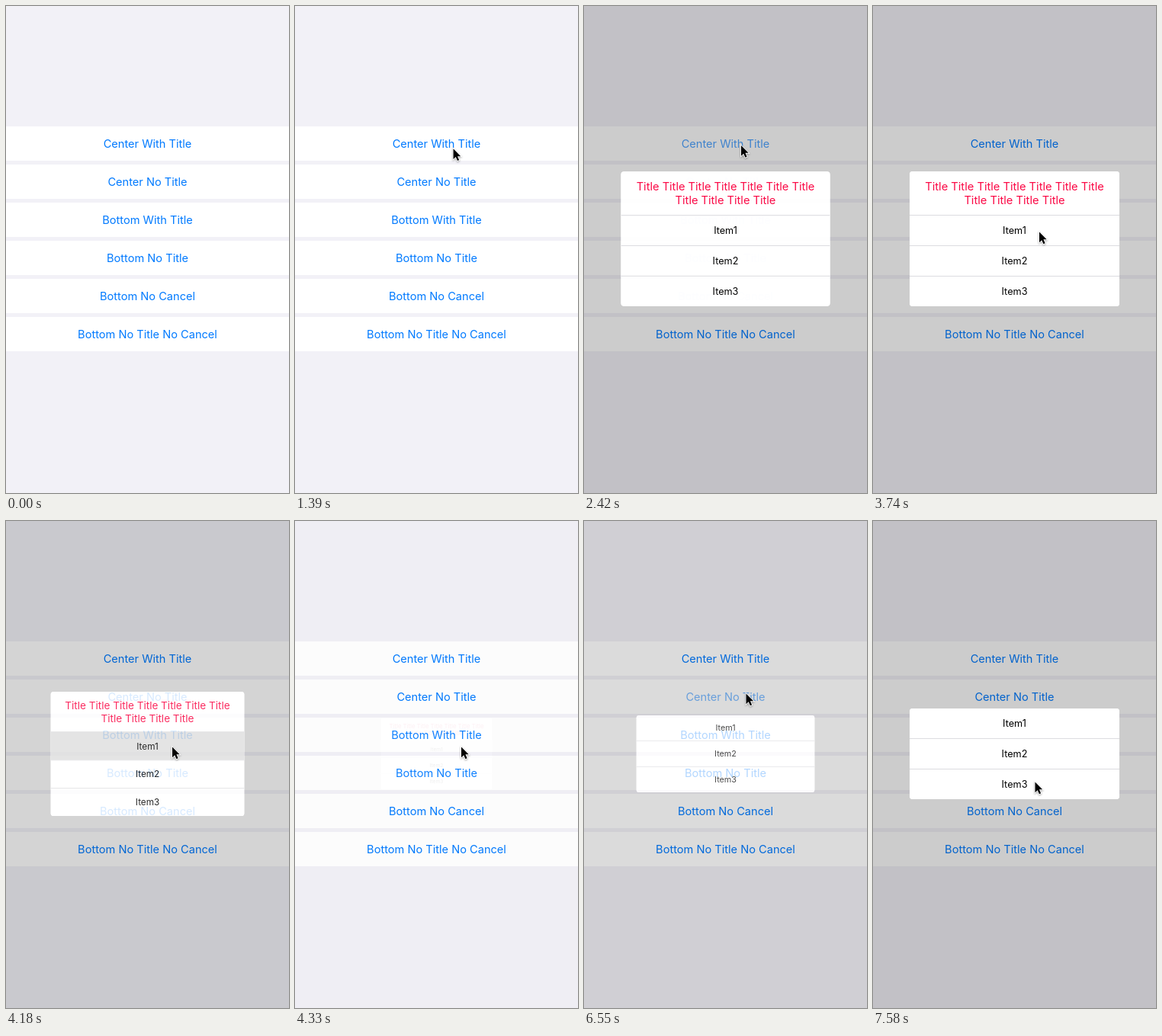
Recreate the animation shown at these times as an HTML page. Size 371x639 px, loop 8 s.

```html
<!DOCTYPE html>
<html lang="en">
<head>
<meta charset="utf-8">
<title>Popup menus</title>
<style>
  html, body { margin: 0; width: 100%; height: 100%; overflow: hidden; }
  body { position: relative; background: #f2f1f7; font: 14.6px Inter, sans-serif; text-align: center; }
  .row {
    position: absolute; left: 0; width: 371px; height: 45px; line-height: 47px;
    background: #fff; color: #007aff; white-space: nowrap;
  }
  /* The shadow dims everything around the popup, but not what shows through it. */
  .popup {
    --shown: 0;
    position: absolute; left: 48px; width: 275px; border-radius: 4px;
    box-shadow: 0 0 0 2000px rgba(0, 0, 0, calc(.2 * var(--shown)));
    transform: scale(calc(.5 + .5 * var(--shown)));
  }
  .sheet { overflow: hidden; background: #fff; border-radius: 4px; opacity: var(--shown); }
  .title {
    box-sizing: border-box; height: 57px; padding-top: 12px; line-height: 17.6px;
    font-size: 14.7px; color: #fb0845; white-space: nowrap;
  }
  .item { height: 39px; line-height: 39px; font-size: 12.7px; color: #000; }
  * + .item { border-top: 1px solid #dcdce0; }
  .picked { background: rgba(0, 0, 0, calc(.15 * var(--shown))); }
  #cursor {
    position: absolute; left: 0; top: 0; overflow: visible;
    filter: drop-shadow(0 1px 1px rgba(0, 0, 0, .35));
  }
</style>
</head>
<body>
<div class="popup" id="titled" style="top:217px"><div class="sheet">
  <div class="title">Title Title Title Title Title Title Title<br>Title Title Title Title</div>
</div></div>
<div class="popup" id="plain" style="top:246px"><div class="sheet"></div></div>
<svg id="cursor" width="12" height="19">
  <path transform="translate(0 .5) scale(.94)" stroke="#fff" stroke-width="1.8" paint-order="stroke"
    d="M0 0V14.6L3.4 11.4L5.8 16.8L8.1 15.8L5.8 10.5H10.3Z"/>
</svg>
<script>
const LOOP = 8000, TICK = 147.5, ENTER = 500, SLACK = 8;
const OPEN_MS = 250, FADE_MS = 385;
const byId = id => document.getElementById(id);
const cursor = byId('cursor');

const labels = ['Center With Title', 'Center No Title', 'Bottom With Title',
  'Bottom No Title', 'Bottom No Cancel', 'Bottom No Title No Cancel'];

function add(parent, className, text, before = null) {
  const el = document.createElement('div');
  el.className = className;
  el.innerHTML = `<span>${text}</span>`;
  return parent.insertBefore(el, before);
}

const buttons = labels.map((label, i) => {
  const row = add(document.body, 'row', label, byId('titled'));
  row.style.top = 158 + 50 * i + 'px';
  return row.firstChild;
});

const menus = [
  { el: byId('titled'), button: buttons[0], press: 2100, open: 2181, pick: 3850, close: 4123 },
  { el: byId('plain'), button: buttons[1], press: 6230, open: 6390, pick: Infinity, close: Infinity }
];
for (const { el } of menus) {
  for (let n = 1; n <= 3; n++) add(el.firstElementChild, 'item', 'Item' + n);
}

const clamp = x => Math.min(1, Math.max(0, x));
const ease = x => .5 - .5 * Math.cos(Math.PI * clamp(x));
const between = (t, from, to) => ease((t - from) / (to - from));

// Each glide carries the pointer on from wherever the last one left it.
function pointerAt(t) {
  let x = 352, y = 230;
  const glide = (from, to, toX, toY) => {
    const k = between(t, from, to);
    x += (toX - x) * k;
    y += (toY - y) * k;
  };
  glide(ENTER, 940, 208, 188);
  glide(1250, 1680, 206, 182.5);
  glide(2715, 3450, 218, 316);
  glide(3450, 3740, 218, 296);
  glide(4480, 5500, 212.5, 226);
  glide(6550, 7140, 216.5, 321);
  glide(7290, 7580, 212.5, 342);
  return [x, y];
}

function draw(t) {
  for (const { el, button, press, open, pick, close } of menus) {
    const shown = ease((t - open) / OPEN_MS) * (1 - ease((t - close) / OPEN_MS));
    el.style.setProperty('--shown', shown);
    el.style.visibility = shown ? 'visible' : 'hidden';
    el.querySelector('.item').classList.toggle('picked', t >= pick);
    button.style.opacity = t < press ? 1 : .2 + .8 * clamp((t - open) / FADE_MS);
  }
  const [x, y] = pointerAt(t);
  cursor.style.visibility = t < ENTER ? 'hidden' : 'visible';
  cursor.style.transform = `translate(${x}px, ${y}px)`;
}

// The screen refreshes in coarse ticks, so motion is sampled at each one.
const sample = t => ENTER + TICK * Math.floor((t - ENTER + SLACK) / TICK);

const start = performance.now();
function frame() {
  draw(sample((performance.now() - start) % LOOP));
  requestAnimationFrame(frame);
}
frame();
</script>
</body>
</html>
```
